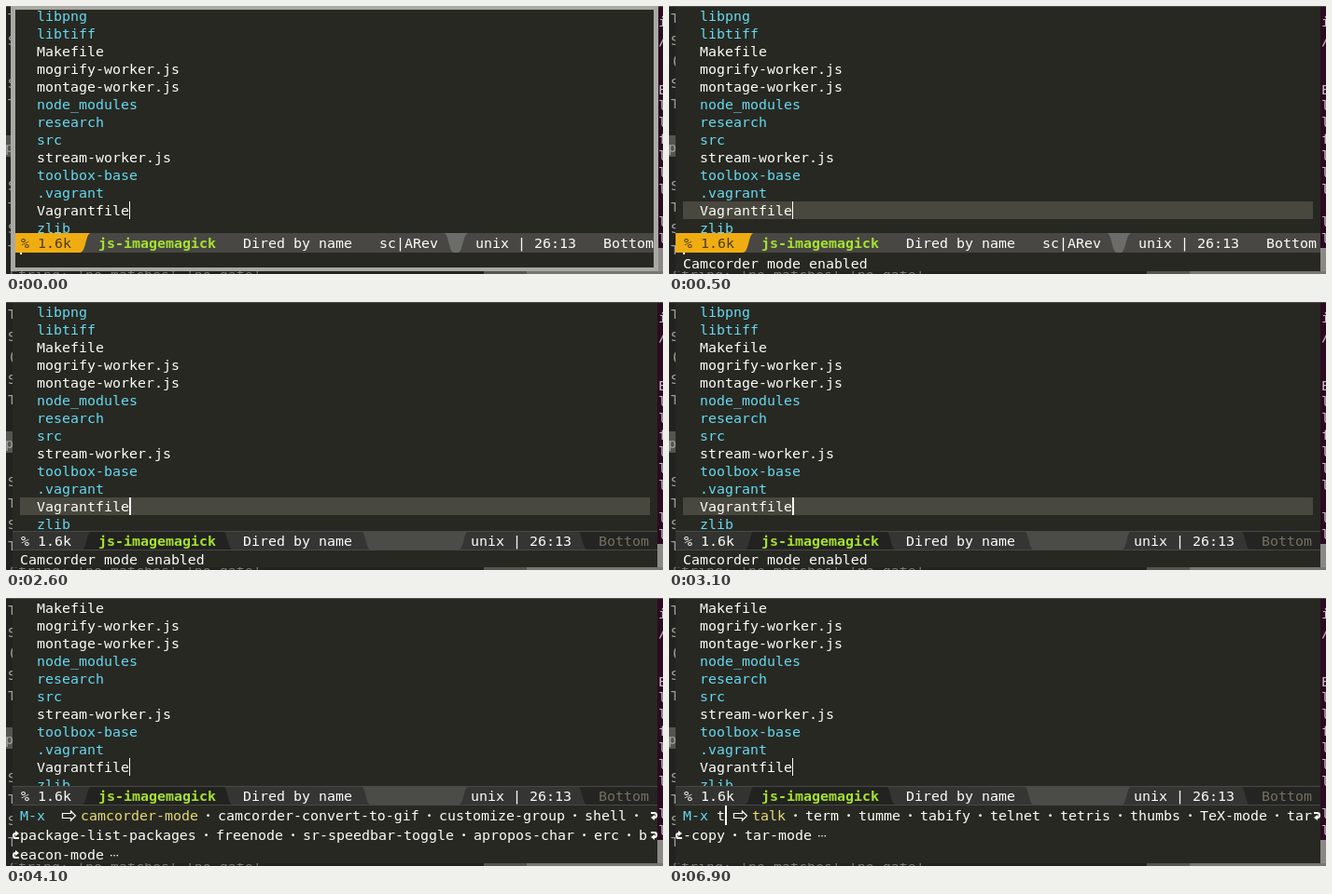
Recreate the animation shown at these times as an HTML page. Size 704 by 288 pixels, loop 8000 ms.

```html
<!DOCTYPE html>
<html lang="en">
<head>
<meta charset="utf-8">
<title>Editor session</title>
<style>
  html, body { margin: 0; width: 100%; height: 100%; overflow: hidden; background: #222; }
  svg { display: block; width: 704px; height: 288px; }
  text { font: 14.95px "DejaVu Sans Mono", "Noto Sans Mono", monospace; white-space: pre; }
  .bold { font-weight: bold; }
  .dot { font: bold 17px "Liberation Serif", serif; text-anchor: middle; }
</style>
</head>
<body>
<svg id="stage" viewBox="0 0 704 288" xmlns="http://www.w3.org/2000/svg"></svg>
<script>
const NS = "http://www.w3.org/2000/svg";
const stage = document.getElementById("stage");
const C = { bg: "#272822", fg: "#fdfdfa", cyan: "#66d9ef", green: "#a6e22e", yellow: "#e6db74" };
const PITCH = 9, GAP = 21, LOOP = 8000;

function add(parent, tag, attrs, content) {
  const el = document.createElementNS(NS, tag);
  for (const k in attrs) el.setAttribute(k, attrs[k]);
  if (content) el.textContent = content;
  parent.append(el);
  return el;
}
const group = (parent = stage) => add(parent, "g", {});
const rect = (p, x, y, width, height, fill) => add(p, "rect", { x, y, width, height, fill });
const path = (p, d, fill) => add(p, "path", { d, fill });
const text = (p, x, y, s, fill = C.fg, cls = "") =>
  add(p, "text", { x, y, fill, class: cls }, s);

function desktop() {
  const g = group();
  rect(g, 0, 0, 704, 288, "#222220");
  rect(g, 0, 139, 7, 23, "#55544f");
  [["T", 18], ["S", 42], ["(", 64], ["S", 88], ["T", 110], ["p", 157],
   ["S", 198], ["T", 221], ["S", 244], ["T", 267]]
    .forEach(([s, y]) => text(g, s === "p" ? -1 : 2, y, s, "#a5a5a0"));
  rect(g, 698, 0, 6, 288, "#2b0a22");
  [["i", 22], ["/", 42], ["E", 95], ["l", 112], ["l", 130], ["f", 148],
   ["l", 166], ["l", 184], ["l", 202], ["l", 237], ["l", 255]]
    .forEach(([s, y]) => text(g, 699, y, s, "#c8c0c4"));
  rect(g, 698, 260, 6, 28, "#8b8985");
  text(g, 4, 294, "String: 'no matches' 'no gate'", "#7a7a75");
  rect(g, 512, 285, 46, 3, "#55554f");
  rect(g, 558, 285, 146, 3, "#77756f");
}

const FILES = ["libpng", "libtiff", "Makefile", "mogrify-worker.js", "montage-worker.js",
  "node_modules", "research", "src", "stream-worker.js", "toolbox-base", ".vagrant",
  "Vagrantfile", "zlib"];
const isFile = s => /^[MV]|\.js$/.test(s);

function files(parent, skip) {
  FILES.slice(skip).forEach((s, i) => text(parent, 33, 16 + i * 19, s, isFile(s) ? C.fg : C.cyan));
}

function activeBar(parent) {
  const g = group(parent);
  rect(g, 7, 244, 691, 21, "#484743");
  path(g, "M7 244H91C85 244 86 265 79 265H7Z", "#f0ad12");
  path(g, "M469 244H496C489 244 490 265 484 265H480C474 265 475 244 469 244Z", "#6c6c68");
  text(g, 16, 260, "% 1.6k", "#4a3a18");
  text(g, 99, 260, "js-imagemagick", C.green, "bold");
  text(g, 254, 260, "Dired by name");
  text(g, 400, 260, "sc|ARev");
  text(g, 503, 260, "unix | 26:13");
  text(g, 640, 260, "Bottom");
  rect(g, 15, 265, 2, 2, C.fg);
}

function idleBar(parent, y) {
  const g = add(parent, "g", { transform: `translate(0 ${y})` });
  const left = (x, fill) => path(g, `M7 0H${x}C${x + 6} 0 ${x + 5} 21 ${x + 12} 21H7Z`, fill);
  const right = (x, fill) => path(g, `M698 0H${x}C${x - 6} 0 ${x - 5} 21 ${x - 12} 21H698Z`, fill);
  rect(g, 7, 0, 691, 21, "#4b4b48");
  left(380, "#353533");
  path(g, "M7 0H232C238 0 237 21 244 21H7Z", "#222220");
  path(g, "M7 0H92C86 0 87 21 80 21H7Z", "#333331");
  right(496, "#353533");
  path(g, "M698 0H612C618 0 617 21 624 21H698Z", "#242422");
  rect(g, 7, 0, 691, 1, "#484845");
  rect(g, 7, 20, 691, 1, "#484845");
  text(g, 16, 16, "% 1.6k");
  text(g, 99, 16, "js-imagemagick", C.green, "bold");
  text(g, 254, 16, "Dired by name");
  text(g, 498, 16, "unix | 26:13");
  text(g, 635, 16, "Bottom", "#75715e");
}

// Lays out completion names with a dot between them.
function names(g, x, y, line, first = C.fg) {
  line.split("|").forEach((s, i) => {
    if (i) {
      text(g, x + GAP / 2, y, "·", C.fg, "dot");
      x += GAP;
    }
    text(g, x, y, s, i ? C.fg : first);
    x += s.length * PITCH;
  });
  return x;
}

function more(g, x, y) {
  for (let i = 0; i < 3; i++) rect(g, x + 7 + i * 3.3, y - 5, 1.4, 1.4, C.fg);
}

function arrow(g, x) {
  add(g, "path", { d: `M${x} 231.5h9v-2.500l5 5l-5 5v-2.500h-9z`, fill: "none", stroke: C.fg, "stroke-width": 1.2 });
}

function wrapMark(g, x, y, flip) {
  const m = add(g, "g", { transform: `translate(${x} ${y}) scale(${flip ? -1 : 1})` });
  add(m, "path", { d: "M0 -3H3.500Q6 -3 6 -.5T3.500 2", fill: "none", stroke: C.fg, "stroke-width": 2.2 });
  path(m, "M0 2L4 -1V5Z", C.fg);
}

desktop();
const win = group();
rect(win, 7, 0, 691, 285, C.bg);
rect(win, 0, 0, 704, 1, "#4c4c48");

const top0 = group(win);
const hl = group(top0);
rect(hl, 15, 210, 675, 19, "#49483e");
files(top0, 0);
const thin = rect(top0, 132, 210, 1, 19, C.fg);
const thick = rect(top0, 132, 210, 2, 19, C.fg);
const active = group(win), idle = group(win);
activeBar(active);
rect(idle, 7, 246, 691, 39, C.bg);
idleBar(idle, 246);
const message = group(win);
text(message, 15, 282, "Camcorder mode enabled");

const top1 = group(win);
files(top1, 2);
rect(top1, 132, 172, 1, 19, C.fg);
rect(top1, 7, 202, 691, 83, C.bg);
idleBar(top1, 202);
text(top1, 15, 239, "M-x", C.cyan);

const empty = group(win);
arrow(empty, 60.5);
names(empty, 80, 239, "camcorder-mode|camcorder-convert-to-gif|customize-group|shell|", C.yellow);
names(empty, 15, 260, "package-list-packages|freenode|sr-speedbar-toggle|apropos-char|erc|b");
more(empty, names(empty, 15, 281, "eacon-mode"), 281);
[234, 255].forEach(y => {
  wrapMark(empty, 691, y);
  wrapMark(empty, 14, y + 21, true);
});
const caret = rect(empty, 51, 223, 2, 21, C.fg);

const typed = group(win);
text(typed, 51, 239, "t");
rect(typed, 60, 223, 2, 21, C.fg);
arrow(typed, 69.5);
names(typed, 89, 239, "talk|term|tumme|tabify|telnet|tetris|thumbs|TeX-mode|tar", C.yellow);
more(typed, names(typed, 15, 260, "-copy|tar-mode"), 260);
wrapMark(typed, 691, 234);
wrapMark(typed, 14, 255, true);

const border = add(stage, "path", {
  d: "M5 0H699V285H5ZM10 4V281H694V4Z", fill: "#a9a9a4", "fill-rule": "evenodd"
});

const show = (el, on) => el.setAttribute("visibility", on ? "inherit" : "hidden");

function draw(t) {
  const menu = t >= 3200, key = t >= 6900, focusLost = t >= 700;
  border.setAttribute("opacity", t < 100 ? 1 : t < 200 ? 0.5 : 0);
  show(top0, !menu);
  show(hl, t >= 500);
  show(thin, !focusLost);
  show(thick, focusLost);
  show(active, !focusLost);
  show(idle, focusLost && !menu);
  show(message, t >= 500 && !menu);
  show(top1, menu);
  show(empty, menu && !key);
  show(caret, menu && !key && (t < 3900 || (t >= 4000 && t < 4100) || t >= 6800));
  show(typed, key);
}

// Visibility is inherited, so children of a hidden group must be hidden with it.
for (const el of [hl, thin, thick]) el.dataset.part = "list";

const start = performance.now();
function tick() {
  const t = (performance.now() - start) % LOOP;
  draw(t);
  requestAnimationFrame(tick);
}
tick();
</script>
</body>
</html>
```
